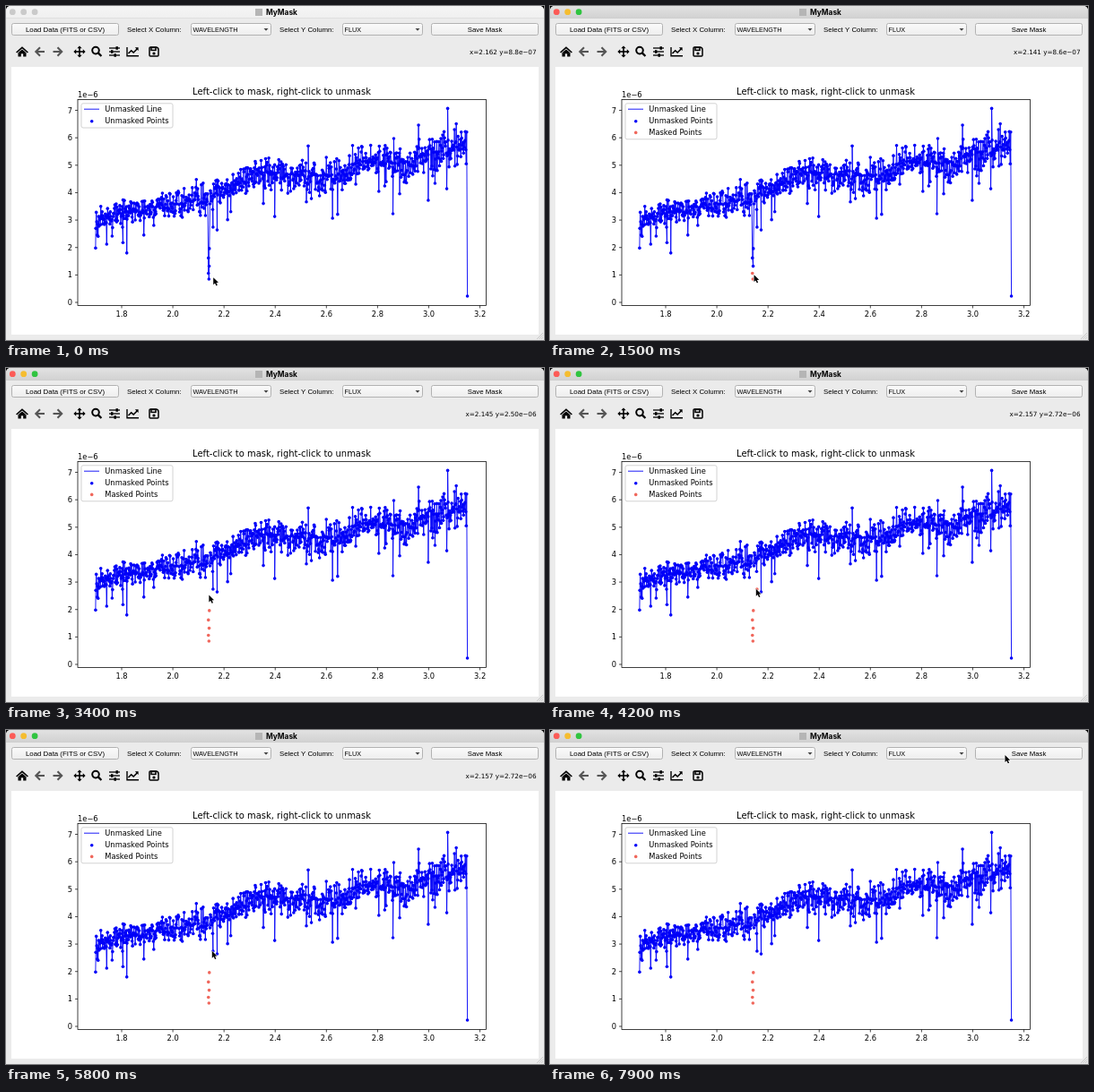
These frames come from a looping animation (600x373 px, 8 s). An HTML page with a canvas:

```html
<!DOCTYPE html>
<html lang="en">
<head>
<meta charset="utf-8">
<title>MyMask</title>
<style>
html, body { margin: 0; width: 100%; height: 100%; overflow: hidden; background: #ebebeb; }
canvas { display: block; width: 600px; height: 373px; }
</style>
</head>
<body>
<canvas id="stage" width="600" height="373"></canvas>
<script>
const c = document.getElementById('stage').getContext('2d');
const LOOP = 8000, STEP = 100, TOP = 7.39;
const UI = '"Liberation Sans", Arial, sans-serif';
const PLOT = '"DejaVu Sans", sans-serif';
const BLUE = '#0000f8', RED = '#f0675c', INK = '#000';

const toX = v => 129 + (v - 1.8) * 285.4;
const toY = v => 331 - v * 30.64;

let seed = 41;
function rand() {
  seed = (seed * 16807) % 2147483647;
  return seed / 2147483647;
}

// Bumps on the rising spectrum: height, centre, width
const bumps = [[.45, .44, .07], [-.25, .63, .06], [.15, .73, .04], [-.4, .84, .025], [-.2, .91, .03], [-.3, 0, .01]];
const flux = u => bumps.reduce((y, [h, m, w]) => y + h * Math.exp(-(((u - m) / w) ** 2)), 3.05 + 2.75 * u);

// The most visible peaks and dips: wavelength, flux
const peaks = [[1.698, 1.98], [1.805, 2.18], [1.82, 1.8], [2.173, 2.64], [2.398, 3.13], [2.529, 5.7],
  [2.624, 3.07], [2.86, 3.23], [2.96, 6.46], [2.998, 3.72], [3.074, 7.07]];

// Points that get masked: wavelength, flux, masked from, masked until
const dip = [700, 1500, 2100, 2700, 3000].map((from, i) =>
  [2.139 + (i % 2 ? 0 : .002 + i * .0004), .85 + .19 * i + .022 * i * i, from, LOOP]);
const picks = [...dip, [2.157, 2.74, 4200, 5700]];

function makePoints() {
  const pts = [...peaks, ...picks], n = 820;
  for (let i = 0; i < n; i++) {
    const u = i / n, x = 1.699 + 1.451 * u;
    let y = flux(u) + (rand() + rand() + rand() - 1.5) * (.42 + .2 * u);
    if (rand() < .07) y += (rand() * 2.1 - 1.4) * (.6 + .3 * u);
    if (Math.abs(x - 2.1405) > .004) pts.push([x, y]);
  }
  pts.sort((a, b) => a[0] - b[0]);
  pts.push([3.151, .23]);
  return pts.map(([x, y, from, until]) => ({ at: [toX(x), toY(y)], from, until }));
}
const points = makePoints();

// Pointer stops: arrive, leave, x and y in plot units
const stops = [[0, 300, 2.162, .88], [600, 1400, 2.141, .86], [1500, 1600, 2.149, .98],
  [2100, 2500, 2.139, 1.43], [3200, 3500, 2.145, 2.5], [4000, 4400, 2.157, 2.72],
  [4800, 5300, 2.173, 2.58], [5600, 5900, 2.157, 2.72], [6500, 6700, 3.1, 8.29], [7400, LOOP, 3.13, 9.86]];

function pointer(t) {
  const i = Math.max(0, stops.findLastIndex(s => t >= s[0]));
  const [, leave, x, y] = stops[i], next = stops[i + 1];
  if (t <= leave || !next) return [x, y];
  const u = (t - leave) / (next[0] - leave), e = u * u * (3 - 2 * u);
  return [x + (next[2] - x) * e, y + (next[3] - y) * e];
}

function text(s, x, y, size, font, align = 'left', weight = '') {
  c.font = `${weight} ${size}px ${font}`;
  c.textAlign = align;
  c.fillStyle = INK;
  c.fillText(s, x, y);
}

function rect(x, y, w, h, fill) {
  c.fillStyle = fill;
  c.fillRect(x, y, w, h);
}

function disc(x, y, r, fill) {
  c.fillStyle = fill;
  c.beginPath();
  c.arc(x, y, r, 0, 7);
  c.fill();
}

function trace(pts) {
  c.beginPath();
  pts.forEach(([x, y]) => c.lineTo(x, y));
}

function line(pts, color, width) {
  trace(pts);
  c.strokeStyle = color;
  c.lineWidth = width;
  c.stroke();
}

function shape(pts, fill) {
  trace(pts);
  c.fillStyle = fill;
  c.fill();
}

function panel(x, y, w, h, r, fill, stroke, width = 1) {
  c.beginPath();
  c.roundRect(x, y, w, h, r);
  c.fillStyle = fill;
  c.fill();
  c.strokeStyle = stroke;
  c.lineWidth = width;
  c.stroke();
}

function shade(y, h, from, to) {
  const g = c.createLinearGradient(0, y, 0, y + h);
  g.addColorStop(0, from);
  g.addColorStop(1, to);
  return g;
}

function button(x, w) {
  panel(x + .5, 19.5, w, 13, 2, shade(19, 14, '#fbfbfb', '#ededed'), '#b2b2b2');
}

function combo(x, s) {
  button(x, 89);
  text(s, x + 2.5, 29, 7.25, UI);
  shape([[x + 81.5, 25], [x + 86.5, 25], [x + 84, 27.8]], '#444');
}

function titleBar(active) {
  rect(0, 0, 600, 13, active ? shade(0, 13, '#e2e2e2', '#d2d2d2') : shade(0, 13, '#f5f5f5', '#f0f0f0'));
  rect(0, 13, 600, .6, active ? '#bdbdbd' : '#d8d8d8');
  ['#fc5b57', '#f5bd2f', '#30c440'].forEach((f, i) => disc(7.3 + i * 12.4, 6.7, 3.4, active ? f : '#cacaca'));
  rect(278, 3, 8, 8, '#b5b5b5');
  text('MyMask', 290, 9.8, 8.3, 'Inter, sans-serif', 'left', 700);
}

function arrow(x, dir) {
  line([[x - 5 * dir, 51], [x + 4 * dir, 51]], '#555', 2.1);
  line([[x, 46.3], [x + 4.7 * dir, 51], [x, 55.7]], '#555', 2.1);
}

function home() {
  line([[11.6, 52], [18, 46.4], [24.4, 52]], INK, 1.6);
  shape([[13.5, 52.3], [18, 48.4], [22.5, 52.3]], INK);
  rect(13.5, 52.2, 3.3, 4.3, INK);
  rect(19.2, 52.2, 3.3, 4.3, INK);
  rect(16, 52, 4, 1.3, INK);
}

function move() {
  for (let i = 0; i < 4; i++) {
    c.save();
    c.translate(82, 51);
    c.rotate(i * Math.PI / 2);
    line([[0, 0], [5, 0]], INK, 1.6);
    shape([[6.6, 0], [3.8, -2.7], [3.8, 2.7]], INK);
    c.restore();
  }
}

function tools() {
  home();
  arrow(38, -1);
  arrow(57.5, 1);
  move();

  c.beginPath();
  c.arc(100, 49.6, 3.8, 0, 7);
  c.strokeStyle = INK;
  c.lineWidth = 2;
  c.stroke();
  line([[102.8, 52.4], [106.4, 56]], INK, 2.3);

  for (let i = 0; i < 3; i++) {
    const y = 47 + i * 4;
    line([[115, y], [127, y]], INK, 1.3);
    rect(i % 2 ? 117 : 122.5 - i, y - 1.8, 2.4, 3.6, INK);
  }

  line([[135, 46], [135, 55.8], [148, 55.8]], INK, 1.4);
  line([[136.5, 53], [139.7, 49.8], [142.2, 52], [146.4, 47.7]], INK, 1.6);
  shape([[143.8, 46.3], [147.6, 46.3], [147.6, 50.1]], INK);

  panel(160, 46, 10, 10, [1, 3, 1, 1], 'transparent', INK, 1.5);
  c.strokeRect(162, 46.4, 5, 3);
  disc(165, 53, 1.6, INK);
}

function chrome(t) {
  rect(0, 0, 600, 373, INK);
  c.save();
  c.beginPath();
  c.roundRect(0, 0, 600, 373, [5, 5, 0, 0]);
  c.clip();
  rect(0, 0, 600, 373, '#ebebeb');
  titleBar(t >= 300);
  c.restore();
  button(6, 119);
  text('Load Data (FITS or CSV)', 66, 29, 7.85, UI, 'center');
  text('Select X Column:', 135, 29, 7.85, UI);
  combo(206, 'WAVELENGTH');
  text('Select Y Column:', 305, 29, 7.85, UI);
  combo(375, 'FLUX');
  button(474, 119);
  text('Save Mask', 534, 29, 7.8, UI, 'center');
  tools();
  rect(6, 68, 588, 299, '#fff');
  for (let i = 0; i < 3; i++) line([[592 + i * 2.5, 372], [599, 365 + i * 2.5]], '#b0b0b0', .6);
}

function axes() {
  text('Left-click to mask, right-click to unmask', 307.5, 98.7, 9.96, PLOT, 'center');
  text('1e−6', 80, 102.3, 8.3, PLOT);
  for (let i = 0; i < 8; i++) {
    const v = 1.8 + i * .2, x = toX(v), y = toY(i);
    line([[x, 334.5], [x, 337.5]], INK, .7);
    text(v.toFixed(1), x, 346.5, 8.3, PLOT, 'center');
    line([[77, y], [80, y]], INK, .7);
    text(String(i), 74, y + 3, 8.3, PLOT, 'right');
  }
}

function spectrum(t) {
  const masked = p => t >= p.from && t < p.until;
  c.lineJoin = 'round';
  line(points.filter(p => !masked(p)).map(p => p.at), BLUE, .9);
  c.lineJoin = 'miter';
  points.forEach(p => disc(...p.at, 1.8, masked(p) ? RED : BLUE));
  c.strokeStyle = INK;
  c.lineWidth = .75;
  c.strokeRect(80, 104.5, 455.5, 230);
}

function legend(full) {
  panel(84, 108.8, 102, full ? 40 : 27.2, 2, 'rgba(255,255,255,.8)', '#d2d2d2');
  line([[87, 115.2], [104, 115.2]], BLUE, .9);
  const rows = ['Unmasked Line', 'Unmasked Points', 'Masked Points'];
  rows.slice(0, full ? 3 : 2).forEach((s, i) => {
    text(s, 110.3, 118.1 + i * 12.7, 8.3, PLOT);
    if (i) disc(95.7, 116 + i * 12.7, 1.8, i > 1 ? RED : BLUE);
  });
}

// The readout trails the pointer by one step
function readout(t) {
  const [x, y] = pointer(t - STEP);
  if (y > TOP || pointer(t)[1] > TOP) return;
  const value = y < 1 ? (y * 10).toFixed(1) + 'e−07' : y.toFixed(2) + 'e−06';
  text(`x=${x.toFixed(3)} y=${value}`, 591.5, 53.5, 7.2, PLOT, 'right');
}

function cursor(t) {
  const [x, y] = pointer(t);
  const tip = [[0, 0], [0, 8.6], [2, 6.8], [3.5, 10], [5, 9.3], [3.6, 6.2], [6.2, 6.1], [0, 0]];
  c.save();
  c.translate(toX(x) - 1.1, toY(y) - .8);
  c.scale(.92, .92);
  line(tip, '#fff', 1.3);
  shape(tip, INK);
  c.restore();
}

function draw(t) {
  chrome(t);
  readout(t);
  axes();
  spectrum(t);
  legend(t >= dip[0][2]);
  cursor(t);
}

let shown = -1;
const start = performance.now();
function tick() {
  const t = Math.floor((performance.now() - start) % LOOP / STEP) * STEP;
  if (t !== shown) draw(shown = t);
  requestAnimationFrame(tick);
}
tick();
</script>
</body>
</html>
```
